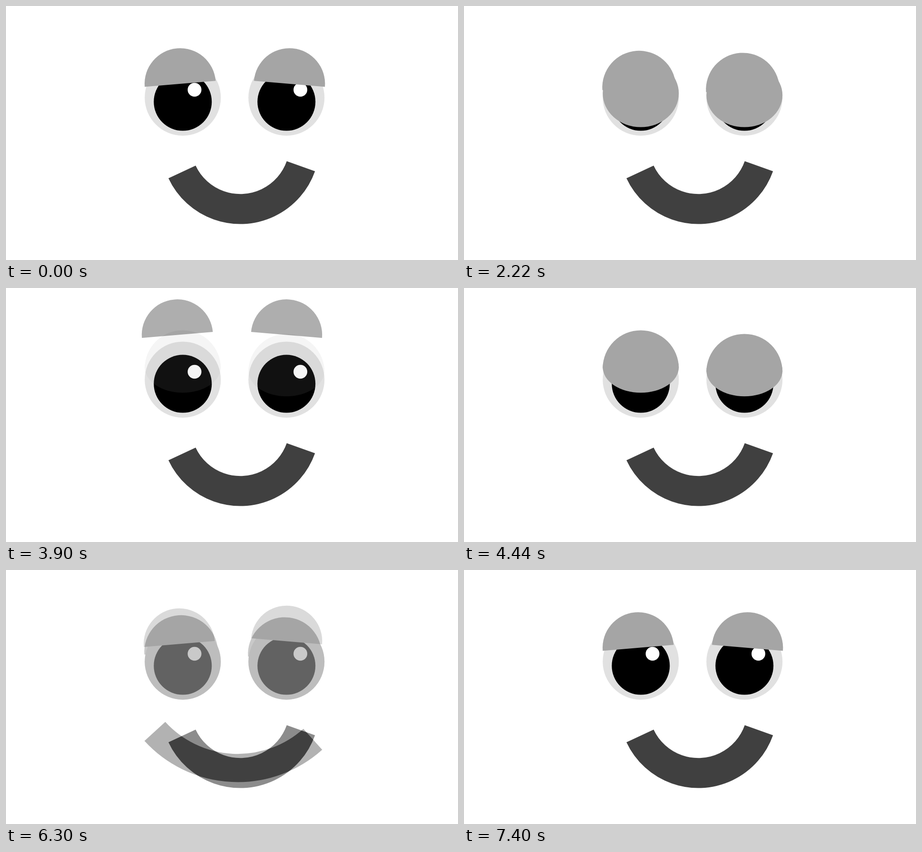
Animation of 998x561 px, one loop 8.88 s. Source, as an HTML page with a canvas:

```html
<!DOCTYPE html>
<html lang="en">
<head>
<meta charset="utf-8">
<title>Sleepy face</title>
<style>
  html, body { margin: 0; width: 100%; height: 100%; overflow: hidden; background: #fff; }
  canvas { display: block; }
</style>
</head>
<body>
<canvas id="stage" width="998" height="561"></canvas>
<script>
const stage = document.getElementById('stage');
const LID = '#a5a5a5';
const EYE = { y: 202.4, r: 84, top: 118.4, bottom: 286.4 };
const SIDES = [0, 1];                           // left, right
const eyeX = side => 390.3 + 228.9 * side;
const rad = degrees => degrees * Math.PI / 180;
const mix = (a, b, amount) => a + (b - a) * amount;

function ellipse(ctx, color, x, y, rx, ry = rx) {
  ctx.fillStyle = color;
  ctx.beginPath();
  ctx.ellipse(x, y, rx, ry, 0, 0, 2 * Math.PI);
  ctx.fill();
}

// Upper half of a disc, turned by tilt degrees
function dome(ctx, x, y, r, tilt) {
  ctx.fillStyle = LID;
  ctx.beginPath();
  ctx.arc(x, y, r, rad(180 + tilt), rad(360 + tilt));
  ctx.fill();
}

function eye(ctx, side) {
  ellipse(ctx, '#e1e1e1', eyeX(side), EYE.y, EYE.r);
  ellipse(ctx, '#000', eyeX(side), 211.6, 64);
  ellipse(ctx, '#fff', eyeX(side) + 26 + 4.8 * side, 185, 15.2);
}

// Mirrored pair of half lids around a common centre
const openLids = (x, y, spread = 120.6, slant = 0) => (ctx, side) => {
  const sign = 2 * side - 1;
  dome(ctx, x + sign * spread, y - sign * slant, 78.6, sign * 4.8);
};

// squeeze: from drooping to closing; cover: from closing to fully shut.
// The right lid lags below the left one.
const closedLids = (squeeze, cover = 0) => (ctx, side) => {
  const top = EYE.top + 8 * (1 - cover) * side;
  const drooped = mix(231.3, 267.6, squeeze) + 8 * (1 - squeeze) * side;
  const bottom = mix(drooped, EYE.bottom, cover);
  ellipse(ctx, LID, eyeX(side), (top + bottom) / 2, EYE.r, (bottom - top) / 2);

  const inset = 2.7 * squeeze;
  const y = 177.4 + inset + cover + (8 - 3.4 * squeeze) * side;
  dome(ctx, eyeX(side) - 3.7 * squeeze, y, EYE.r - inset, -4 * squeeze);
};

const mouth = (x, y, radius, thickness, from, to) => ctx => {
  ctx.strokeStyle = '#404040';
  ctx.lineWidth = thickness;
  ctx.beginPath();
  ctx.arc(x, y, radius, rad(from), rad(to));
  ctx.stroke();
};

const smile = mouth(517.3, 306.5, 141.9, 66.2, 19.5, 155);
const grin = mouth(511.8, 189.4, 247.9, 62.2, 48.1, 137.6);

function renderPose(drawLid, drawMouth = smile) {
  const layer = document.createElement('canvas');
  layer.width = stage.width;
  layer.height = stage.height;
  const ctx = layer.getContext('2d');
  ctx.fillStyle = '#fff';
  ctx.fillRect(0, 0, layer.width, layer.height);
  for (const side of SIDES) {
    eye(ctx, side);
    drawLid(ctx, side);
  }
  drawMouth(ctx);
  return layer;
}

const sleepy = renderPose(openLids(505.2, 171.9));
const raised = renderPose(openLids(498.9, 103.7));
const happy = renderPose(openLids(501.1, 160.4, 118.5, 3), grin);
const drooping = renderPose(closedLids(0));
const closing = renderPose(closedLids(1));
const shut = renderPose(closedLids(1, 1));

const SEQUENCE = [sleepy, closing, shut, closing, sleepy, raised,
  drooping, closing, shut, happy, sleepy];
const LOOP = 8880, FIRST_FADE = 200, PERIOD = 740, STEP = 60, STEPS = 10;
const screen = stage.getContext('2d');

function show(layer, alpha) {
  screen.globalAlpha = alpha;
  screen.drawImage(layer, 0, 0);
}

// Stepped cross-fade from each pose to the next, then a short hold
function draw(time) {
  const t = time % LOOP - FIRST_FADE;
  if (t < 0) return show(SEQUENCE[0], 1);
  const index = Math.min(Math.floor(t / PERIOD), SEQUENCE.length - 2);
  const next = SEQUENCE[index + 1];
  let step = Math.min(Math.floor((t - index * PERIOD) / STEP) + 1, STEPS);
  // Shutting lingers on its first step
  if (next === shut && step === 2) step = 1;
  show(SEQUENCE[index], 1);
  show(next, step / STEPS);
}

const start = performance.now();
function tick() {
  draw(performance.now() - start);
  requestAnimationFrame(tick);
}
tick();
</script>
</body>
</html>
```
